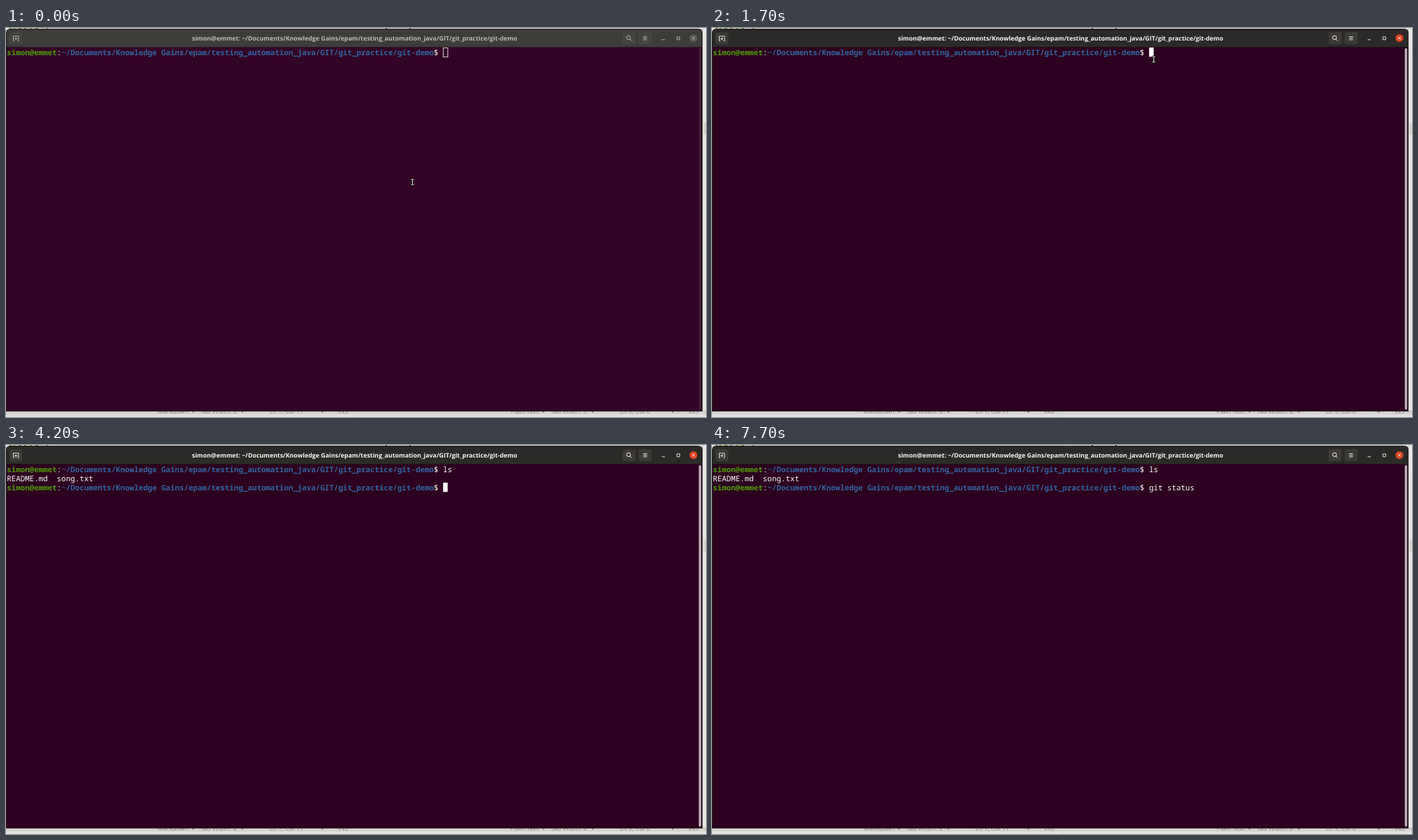
These frames come from a looping animation (1003x558 px, 8 s). An HTML page:

```html
<!DOCTYPE html>
<html lang="en">
<head>
<meta charset="utf-8">
<title>Terminal</title>
<style>
  html, body { margin: 0; width: 100%; height: 100%; overflow: hidden; background: #f0efed; }
  svg { display: block; width: 100%; height: 100%; }
  text { text-rendering: geometricPrecision; white-space: pre; }
  #win { --bar: #3d3c39; --body: #320425; --ink: #b9b8b5; --btn: #454440; --close: #5b5a56; --thumb: #431c37; }
  #win.focus { --bar: #2b2a28; --body: #2c001e; --ink: #f4f4f3; --btn: #3c3a37; --close: #dd431c; --thumb: #beb3ba; }
  .bar { fill: var(--bar); }
  .body { fill: var(--body); }
  .btn { fill: var(--btn); }
  .close { fill: var(--close); }
  .thumb { fill: var(--thumb); }
  .icon { fill: none; stroke: var(--ink); }
  .title { fill: var(--ink); font: bold 8.86px "Open Sans", "Noto Sans", sans-serif; }
  .term { fill: #fff; font: 10.85px "Noto Sans Mono", "DejaVu Sans Mono", monospace; }
  .user { fill: #4e9a06; font-weight: bold; }
  .path { fill: #3465a4; font-weight: bold; }
  .status { fill: #858381; font: 9px "Open Sans", "Noto Sans", sans-serif; }
</style>
</head>
<body>
<svg viewBox="0 0 1003 558">
  <defs>
    <linearGradient id="low" x2="0" y2="1"><stop stop-color="#c8c6c4"/><stop offset="1" stop-color="#e9e8e6"/></linearGradient>
    <linearGradient id="side"><stop stop-color="#d3d1cf"/><stop offset="1" stop-color="#f1f0ef"/></linearGradient>
  </defs>

  <!-- editor windows behind the terminal -->
  <rect width="1003" height="558" fill="#efeeec"/>
  <rect x="997" width="6" height="558" fill="url(#side)"/>
  <rect x="998" y="136" width="5" height="17" fill="#d9d5d0"/>
  <rect y="549" width="1003" height="9" fill="url(#low)"/>
  <path d="M502.5 0V2M502.5 549V558" stroke="#cfcdca"/>
  <path d="M5 .5h3m3 0h2m5 0h4m4 0h3m6 0h2m5 0h4m12 0h2" stroke="#7d9a3c"/>
  <path d="M544 .5h2m32 0h2" stroke="#444"/>
  <g class="status" id="status"></g>

  <g id="win">
    <path d="M0 550V7q0-6 6-6H992q6 0 6 6V550z" fill="#1d1a1a"/>
    <path class="bar" d="M1 27.5V7q0-5 5-5H992q5 0 5 5V27.5z"/>
    <rect class="body" x="1" y="27.5" width="996" height="522"/>
    <rect class="thumb" x="992.7" y="29" width="3.4" height="518.5" rx="1.7"/>
    <g class="btn">
      <rect x="5" y="6" width="18.5" height="17.5" rx="2.5"/>
      <rect x="883.5" y="6" width="18.5" height="17.5" rx="2.5"/>
      <rect x="906.5" y="6" width="18.5" height="17.5" rx="2.5"/>
    </g>
    <circle class="close" cx="985" cy="14.5" r="5.6"/>
    <g class="icon">
      <path d="M12 18.3h-1.5v-6.5h7.5v6.5h-1.5M14.2 13.5v4M12.2 15.5h4" stroke-width=".9"/>
      <circle cx="892" cy="13.8" r="2.8"/>
      <path d="M894 16l2.5 2.5M913 12.5h5.5M913 14.7h5.5M913 16.9h5.5M939.5 16.8h4.5M961.3 12.8h4v4h-4z" stroke-width=".9"/>
      <path d="M983 12.5l4 4m0-4l-4 4"/>
    </g>
    <text class="title" x="499.5" y="17.8" text-anchor="middle">simon@emmet: ~/Documents/Knowledge Gains/epam/testing_automation_java/GIT/git_practice/git-demo</text>

    <g class="term">
      <text id="prompt" x="1.3" y="39"><tspan class="user">simon@emmet</tspan>:<tspan class="path">~/Documents/Knowledge Gains/epam/testing_automation_java/GIT/git_practice/git-demo</tspan>$</text>
      <text id="cmd1" x="626.3" y="39"></text>
      <g id="after">
        <text x="1.3" y="52">README.md  song.txt</text>
        <use href="#prompt" y="26"/>
        <text id="cmd2" x="626.3" y="65"></text>
      </g>
    </g>
    <rect id="hollow" x="626.5" y="28.5" width="6.5" height="13" fill="none" stroke="#d6cdd3"/>
    <rect id="block" width="6.5" height="13.3"/>
  </g>

  <g id="mouse" fill="none">
    <path d="M-2.5-4H2.5M0-4V4M-2.5 4H2.5" stroke="#111" stroke-width="2.4"/>
    <path d="M-2-3.8H2M0-4V4M-2 3.8H2" stroke="#ddd" stroke-width="1.1"/>
  </g>
</svg>

<script>
const LOOP = 8000, CELL = 6.51, START = 626.3;
const $ = id => document.getElementById(id);
const show = (id, on) => $(id).style.display = on ? "" : "none";

const ls = { text: "ls", times: [3800, 3900] };
const git = { text: "git status", times: [5100, 5300, 5500, 5700, 5900, 6300, 6500, 6800, 6900, 7100] };
const blinks = [[2200, 2800], [3400, 3800], [4700, 5100], [7700, LOOP]];

const typed = (cmd, t) => cmd.text.slice(0, cmd.times.filter(at => at <= t).length);

const statusBar = (x, mode, arrow, place) => [
  [x, mode], [arrow, "▾"], [arrow + 12.5, "Tab Width: 8"], [arrow + 70.5, "▾"],
  [arrow + 111.5, place], [arrow + 185, "▾"], [arrow + 210, "INS"]
].map(([x, s]) => `<text x="${x}" y="553.3">${s}</text>`).join("");
$("status").innerHTML = statusBar(217, "Markdown", 266, "Ln 1, Col 11") + statusBar(723, "Plain Text", 768, "Ln 9, Col 6");

function mouseAt(t) {
  if (t >= 1900) return [635, 45];
  if (t >= 1700) return [633 + (t - 1700) / 100, 45];
  const p = Math.min(1, Math.max(0, (t - 1100) / 500));
  const k = p * p * (3 - 2 * p);
  return [582.5 + 51.5 * k, 221 - 169 * k];
}

function draw(now) {
  const t = now % LOOP;
  const entered = t >= 4200;
  const first = typed(ls, t), second = typed(git, t);
  const column = (entered ? second : first).length;

  $("win").classList.toggle("focus", t >= 1700);
  $("cmd1").textContent = first;
  $("cmd2").textContent = second;
  show("after", entered);

  show("hollow", t < 1600);
  show("block", t >= 1600 && !blinks.some(([off, on]) => t >= off && t < on));
  $("block").setAttribute("x", START + column * CELL);
  $("block").setAttribute("y", entered ? 54 : 28);
  $("block").setAttribute("fill", t < 1700 ? "#ddd5da" : "#fff");

  show("mouse", t < 3800);
  $("mouse").setAttribute("transform", `translate(${mouseAt(Math.floor(t / 100) * 100)})`);
  requestAnimationFrame(draw);
}
requestAnimationFrame(draw);
</script>
</body>
</html>
```
